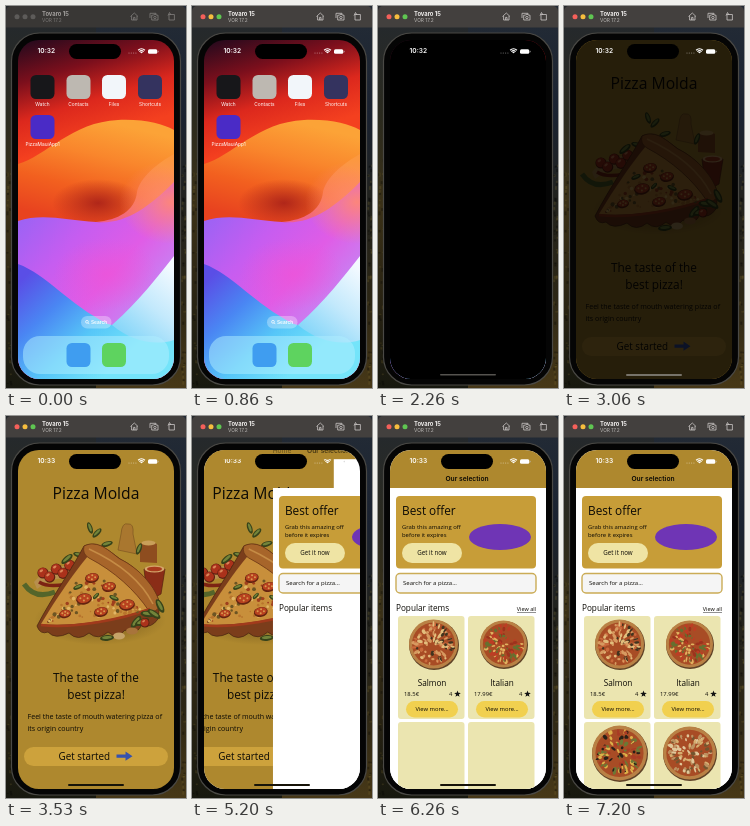
These frames come from a looping animation (180x382 px, 8000 ms). An HTML page with a canvas:

```html
<!DOCTYPE html>
<html lang="en">
<head>
<meta charset="utf-8">
<title>Pizza app demo</title>
<style>
html, body { margin: 0; width: 100%; height: 100%; overflow: hidden; background: #15130d; }
canvas { display: block; width: 180px; height: 382px; }
</style>
</head>
<body>
<canvas id="stage"></canvas>
<script>
const W = 180, H = 382, LOOP = 8000;
const SCREEN = { x: 12, y: 34, w: 156, h: 339, r: 21 };
const GOLD = '#ae882e', UI = 'Inter, sans-serif', BODY = '"Open Sans", sans-serif';
const canvas = document.getElementById('stage');
const ctx = canvas.getContext('2d');
const dpr = Math.max(1, window.devicePixelRatio || 1);
canvas.width = W * dpr;
canvas.height = H * dpr;

const clamp = v => Math.min(1, Math.max(0, v));
const mix = (a, b, p) => a + (b - a) * p;

function seeded(seed) {
  return () => (seed = (seed * 16807) % 2147483647) / 2147483647;
}

function box(x, y, w, h, r, fill, stroke, line = 1) {
  ctx.beginPath();
  ctx.roundRect(x, y, w, h, r);
  if (fill) { ctx.fillStyle = fill; ctx.fill(); }
  if (stroke) { ctx.strokeStyle = stroke; ctx.lineWidth = line; ctx.stroke(); }
}

function oval(x, y, rx, ry, fill, turn = 0) {
  ctx.beginPath();
  ctx.ellipse(x, y, rx, ry, turn, 0, Math.PI * 2);
  ctx.fillStyle = fill;
  ctx.fill();
}

const dot = (x, y, r, fill) => oval(x, y, r, r, fill);

function path(d, fill, stroke, line = 1) {
  const p = new Path2D(d);
  if (fill) { ctx.fillStyle = fill; ctx.fill(p); }
  if (stroke) { ctx.strokeStyle = stroke; ctx.lineWidth = line; ctx.stroke(p); }
}

function label(text, x, y, size, { color = '#0c0a05', align = 'left', weight = 400, font = BODY } = {}) {
  ctx.font = `${weight} ${size}px ${font}`;
  ctx.textAlign = align;
  ctx.textBaseline = 'alphabetic';
  ctx.fillStyle = color;
  ctx.fillText(text, x, y + size * 0.35);
}

function gradient(x0, y0, x1, y1, ...colors) {
  const g = ctx.createLinearGradient(x0, y0, x1, y1);
  colors.forEach((c, i) => g.addColorStop(i / (colors.length - 1), c));
  return g;
}

function scoped(draw, alpha = 1, dx = 0) {
  ctx.save();
  ctx.globalAlpha *= alpha;
  ctx.translate(dx, 0);
  draw();
  ctx.restore();
}

// Soft elliptical patch; rgb is "r,g,b"
function glow(x, y, rx, ry, rgb, strength) {
  ctx.save();
  ctx.translate(x, y);
  ctx.scale(rx, ry);
  const g = ctx.createRadialGradient(0, 0, 0, 0, 0, 1);
  g.addColorStop(0, `rgba(${rgb},${strength})`);
  g.addColorStop(1, `rgba(${rgb},0)`);
  dot(0, 0, 1, g);
  ctx.restore();
}

function fillScreen(color) {
  ctx.fillStyle = color;
  ctx.fillRect(SCREEN.x, SCREEN.y, SCREEN.w, SCREEN.h);
}

function desktop() {
  ctx.fillStyle = gradient(0, 20, 0, H, '#25292c', '#2b2a1e', '#3b3117', '#2a2413', '#17180f');
  ctx.fillRect(0, 0, 90, H);
  ctx.fillStyle = gradient(0, 20, 0, H, '#222a35', '#1a2230', '#22221c', '#2c2615', '#473817');
  ctx.fillRect(90, 0, 90, H);
  const rnd = seeded(41);
  for (let i = 0; i < 90; i++) {
    ctx.fillStyle = rnd() < 0.5 ? 'rgba(130,108,48,.22)' : 'rgba(0,0,0,.3)';
    ctx.fillRect(rnd() < 0.5 ? rnd() * 5 : 175 + rnd() * 4, 150 + rnd() * 230, 2, 1 + rnd() * 3);
  }
}

function titleBar(focused) {
  box(0, 0, W, 21.5, [5, 5, 0, 0], focused ? '#43403e' : '#393735');
  const lights = focused ? ['#f4605a', '#f6bd3e', '#5fc652'] : ['#5d5b59', '#5d5b59', '#5d5b59'];
  lights.forEach((c, i) => dot(11 + i * 8, 10.7, 2.5, c));
  const main = focused ? '#f1efee' : '#a3a09e', sub = focused ? '#bab7b5' : '#7b7876';
  label('Tovaro 15', 36, 8, 5.8, { color: main, weight: 700, font: UI });
  label('VOR 17.2', 36, 14.2, 4.8, { color: sub, font: UI });
  const ink = focused ? '#c9c6c4' : '#817e7c';
  path('M124.5 10.5 L128.3 7 L132 10.5 M125.6 10 V14 H131 V10 M127.6 14 V11.4 H129 V14', null, ink, 0.8);
  path('M144 12 V7.3 H150 V9 M145.7 9.2 H147.2 L148 8.4 H149.7 L150.4 9.2 H152 V14 H145.7 Z', null, ink, 0.8);
  ctx.beginPath();
  ctx.arc(148.9, 11.5, 1.2, 0, 7);
  ctx.stroke();
  path('M163 8.5 H168.4 V14 H163 Z M162 9.5 L163.5 6.5 L165 9', null, ink, 0.8);
}

function phoneBody() {
  box(5.5, 27, 169, 352, 28, '#050505', '#4a4945', 1.2);
}

function status(t) {
  label(t < 3300 ? '10:32' : '10:33', 31.5, 45, 6.6, { color: '#fff', weight: 600, font: UI });
  for (let i = 0; i < 4; i++) dot(123 + i * 2.3, 47, 0.6, 'rgba(255,255,255,.45)');
  for (const r of [1.2, 3, 4.8]) {
    ctx.beginPath();
    ctx.arc(135.5, 47.7, r, -2.35, -0.79);
    ctx.strokeStyle = '#fff';
    ctx.lineWidth = 1.2;
    ctx.stroke();
  }
  box(142, 43.2, 9.3, 4.6, 1.5, '#fff');
  box(151.8, 44.8, 0.7, 1.5, 0.3, '#bbb');
}

function wallpaper() {
  fillScreen(gradient(30, 34, 62, 140, '#2b0a1d', '#7c0f1c', '#dc281d', '#f4401f'));
  // Orange crest with a shaded hollow
  path('M12 158 C40 150 66 116 112 114 C140 113 156 118 168 124 V290 H12 Z',
    gradient(95, 114, 70, 216, '#fca337', '#f9862c', '#f2601f', '#e8431f'));
  glow(92, 197, 46, 24, '165,30,24', 0.85);
  path('M168 148 C150 158 134 172 131 186 C129 205 112 214 90 216 L168 225 Z',
    gradient(150, 155, 115, 220, '#fc9840', '#f97b4c', '#ef5f8f'));
  // Violet field
  path('M12 215 C36 207 60 214 90 216 C118 219 142 202 168 176 V373 H12 Z',
    gradient(18, 215, 130, 315, '#9f62f4', '#c65df0', '#e05ce6', '#c486f4'));
  glow(165, 196, 52, 42, '255,138,112', 0.9);
  glow(100, 268, 52, 36, '240,82,214', 0.65);
  // Blue floor and the pale sweep on the right
  path('M12 258 C40 268 62 298 102 318 C130 325 150 322 168 300 V373 H12 Z',
    gradient(14, 275, 100, 368, '#5a4ee6', '#4a86f3', '#56c6f8', '#74e4fa'));
  path('M168 250 C152 270 134 294 106 319 C126 336 150 340 168 334 Z',
    gradient(168, 262, 112, 330, '#f4faff', '#c3e9fc', '#7fd4f8'));
}

function homeIcons() {
  const icon = (x, y, fill, name) => {
    box(x - 12, y - 12, 24, 24, 5.5, fill);
    if (name) label(name, x, y + 17, 4.8, { color: '#fff', align: 'center', font: UI });
  };
  icon(36.5, 81, '#17171a', 'Watch');
  icon(72.5, 81, '#bdb8b1', 'Contacts');
  icon(108, 81, '#f2f6fa', 'Files');
  icon(144, 81, '#34335f', 'Shortcuts');
  icon(36.5, 121, '#4a2bc6', 'PizzaMauiApp1');
  box(75, 310, 30.5, 12.5, 6.2, 'rgba(255,255,255,.3)');
  ctx.beginPath();
  ctx.arc(81, 315.8, 1.4, 0, 7);
  ctx.strokeStyle = '#fff';
  ctx.lineWidth = 0.7;
  ctx.stroke();
  path('M82 316.8 L83.3 318.1', null, '#fff', 0.7);
  label('Search', 85, 316.2, 4.8, { color: '#fff', weight: 600, font: UI });
  box(17, 330, 146, 38, 17, 'rgba(178,240,255,.5)');
  icon(72.5, 349, '#3f9df0');
  icon(108, 349, '#5ed35f');
}

function launch(t) {
  const p = t < 970 ? 0 : 1 - Math.exp(-(t - 970) / 68);
  wallpaper();
  scoped(homeIcons, 1 - clamp((t - 970) / 150));
  if (t < 970) return;
  fillScreen(`rgba(0,0,0,${0.45 * p})`);
  const q = t > 1600 ? 1 : p;
  const x = mix(24, 12, q), y = mix(109, 34, q);
  const right = mix(48, 168, q), bottom = mix(133, 373, q);
  box(x, y, right - x, bottom - y, mix(5.5, 21, q), '#000');
  scoped(() => box(mix(36, 62, q), bottom - 5, mix(5, 56, q), 1.6, 0.8, '#55534f'), q);
}

function tomato(x, y, r) {
  dot(x, y, r, '#5f2011');
  dot(x - 0.3, y - 0.4, r * 0.85, '#ab321b');
  oval(x - r * 0.3, y - r * 0.4, r * 0.35, r * 0.2, '#da8558', -0.6);
}

function leaf(x, y, size, turn) {
  oval(x, y, size, size * 0.42, '#37431a', turn);
  oval(x, y - 0.5, size * 0.7, size * 0.2, '#72843a', turn);
}

function slicePicture() {
  glow(94, 204, 66, 25, '66,45,14', 0.55);
  // Ingredients behind the slice
  leaf(84, 112, 6, -1.9);
  leaf(91, 117, 6, -0.8);
  path('M112 134 L115 118 Q116 106 122 108 Q128 107 127 118 L131 138 Z', '#a9772f', '#76501f', 0.6);
  path('M134 146 V128 Q142 122 151 128 V147 Z', '#8e4d1f');
  oval(142.5, 127, 7, 2.5, '#c99f59');
  path('M138 153 H159 L155 178 Q148 183 141 178 Z', '#8a2d17', '#542311', 0.7);
  oval(148.5, 153, 10, 3.4, '#d3a468');
  oval(148.5, 153, 7.5, 2.3, '#a93a1c');
  leaf(101, 128, 6, -0.3);
  leaf(133, 133, 6, -1.2);
  path('M28 166 Q45 145 76 151 L70 164 Q48 158 31 173 Z', '#b78f4d');
  for (let i = 0; i < 7; i++) tomato(37 + i * 6.7, 157 - i * 1.9 + (i % 2) * 6, 5.6);
  path('M18 168 Q29 184 49 176', null, '#54652a', 5);
  path('M33 166 Q43 172 60 168', null, '#7c2313', 3.5);
  leaf(61, 143, 7, -0.7);
  leaf(73, 139, 6, 0.3);
  // Slice, its crust and the dripping edge
  path('M31 210 C46 181 66 153 78 130 C92 124 103 135 114 143 C132 152 146 168 154 187 L152 203 Q145 213 136 209 Q128 222 119 214 Q111 224 102 216 Q92 225 83 217 Q72 226 63 217 Q49 224 42 216 Q34 219 31 210 Z', '#7b3d1b', '#4e2a12', 0.8);
  path('M35 208 C50 183 67 158 82 140 C101 147 126 171 143 192 C116 203 69 211 35 208 Z', '#c88f3b');
  path('M78 130 C92 123 103 135 114 143 C133 152 151 172 154 189 Q151 197 143 195 C129 174 108 155 83 142 Q76 138 78 130 Z', '#a7652a', '#6a3515', 0.8);
  path('M83 133 C109 145 134 162 147 188', null, '#c58b45', 1.6);
  path('M35 209 C69 213 116 203 144 193', null, '#a13a1c', 2.4);
  const rnd = seeded(77);
  for (let i = 0; i < 95; i++) {
    const u = rnd(), v = rnd();
    dot(42 + u * 92, 206 - u * 10 - v * Math.min(50, u * 120, (1.03 - u) * 85), 0.8 + rnd() * 1.3,
      ['#e1b665', '#9f3f1d', '#b8752d', '#6c5523'][Math.floor(rnd() * 4)]);
  }
  [[86, 162, 7], [103, 171, 7], [78, 183, 8], [59, 198, 6], [121, 189, 8], [95, 196, 7]].forEach(([x, y, r]) => {
    oval(x, y, r, r * 0.7, '#652310', -0.2);
    oval(x, y - 0.7, r * 0.87, r * 0.56, '#b8421f', -0.2);
    for (let i = 0; i < 4; i++) dot(x + Math.cos(i * 1.6) * r * 0.45, y - 0.7 + Math.sin(i * 1.6) * r * 0.28, 1, '#d99a4f');
  });
  leaf(72, 171, 5, -0.4);
  leaf(108, 182, 5, 0.4);
  leaf(90, 180, 4, -0.8);
  // Garnish in front
  for (let i = 0; i < 5; i++) leaf(130 + i * 6, 206 - i * 4 + (i % 2) * 4, 7.5, -0.9 + i * 0.5);
  tomato(139, 207, 4.5);
  oval(113, 220, 6, 3.5, '#c5a368');
  oval(126, 215, 6, 3.5, '#a8743b');
  leaf(101, 222, 7, -0.1);
}

function welcome() {
  fillScreen(GOLD);
  const mid = { align: 'center' };
  label('Pizza Molda', 90, 78, 15.7, mid);
  slicePicture();
  label('The taste of the', 90, 262, 11.8, mid);
  label('best pizza!', 90, 278.5, 11.8, mid);
  label('Feel the taste of mouth watering pizza of', 21.5, 301, 7.1);
  label('its origin country', 21.5, 313, 7.1);
  box(18, 331, 144, 19, 9.5, '#cda23c');
  label('Get started', 52.5, 340.3, 9.9);
  path('M110.5 338.6 H119.5 V335.6 L126.5 340.2 L119.5 344.8 V341.8 H110.5 Z', '#3652ae');
}

function pizza(x, y, r, seed, colors) {
  const rnd = seeded(seed);
  dot(x + 0.5, y + 1, r, '#5f4227');
  dot(x, y, r * 0.98, '#b98145');
  dot(x, y, r * 0.86, '#a84c25');
  for (let i = 0; i < 100; i++) {
    const a = rnd() * 6.283, d = Math.sqrt(rnd()) * r * 0.8;
    oval(x + Math.cos(a) * d, y + Math.sin(a) * d, 1 + rnd() * 2, 0.7 + rnd() * 1.2,
      colors[Math.floor(rnd() * colors.length)], a);
  }
}

const MENU = [
  { x: 20, y: 200, name: 'Salmon', price: '18.5€', r: 25, seed: 13, colors: ['#e2bd7c', '#c96a3c', '#41341f', '#d79a60'] },
  { x: 90, y: 200, name: 'Italian', price: '17.99€', r: 24, seed: 29, colors: ['#bd3d24', '#e1b25f', '#9d321d', '#66702f'] },
  { x: 20, y: 306, r: 28, seed: 51, colors: ['#292017', '#ddb049', '#a93c25', '#6b7835'] },
  { x: 90, y: 306, r: 27, seed: 83, colors: ['#e0c79a', '#bc9160', '#73552f', '#d6ae70'] }
];

function card({ x, y, name, price, r, seed, colors }, loaded) {
  box(x, y, 66.5, 103, 3, '#ebe5b0');
  const mid = x + 34;
  if (loaded) pizza(mid + 1.5, y + (name ? 28 : 31), r, seed, colors);
  if (!name) return;
  label(name, mid, y + 67, 8.2, { align: 'center' });
  label(price, x + 6, y + 78.3, 5.9);
  label('4', x + 51, y + 78.3, 5.9);
  ctx.beginPath();
  for (let i = 0; i < 10; i++) {
    const a = i * Math.PI / 5 - Math.PI / 2, d = i % 2 ? 1.4 : 3.5;
    ctx.lineTo(x + 59.5 + Math.cos(a) * d, y + 78 + Math.sin(a) * d);
  }
  ctx.fillStyle = '#111';
  ctx.fill();
  box(x + 8, y + 85, 52, 16.5, 8.2, '#f1d04f');
  label('View more...', mid, y + 93.2, 5.8, { align: 'center' });
}

function shop(t) {
  ctx.fillStyle = '#fff';
  ctx.fillRect(12, 72, 156, 301);
  box(18, 80, 140, 72.5, 4, '#c79d38');
  label('Best offer', 24, 94.5, 11.8);
  label('Grab this amazing off', 24, 110.5, 5.9);
  label('before it expires', 24, 118.5, 5.9);
  box(24, 127, 60, 20, 10, '#efe4a4');
  label('Get it now', 54, 137, 6.2, { align: 'center' });
  oval(122, 121, 31, 13, '#6f35b5');
  box(18, 157.5, 140, 19.5, 4, '#f5f5f5', '#cbac56', 1.4);
  label('Search for a pizza...', 25, 167.2, 6);
  label('Popular items', 18, 192, 8.2);
  label('View all', 158, 193.5, 5.5, { align: 'right' });
  ctx.fillStyle = '#222';
  ctx.fillRect(139, 196.3, 19, 0.5);
  if (t >= 6200) MENU.forEach((item, i) => card(item, t >= 6260 + Math.floor(i / 2) * 70));
}

function push(t) {
  const s = Math.exp(-Math.max(0, t - 5089) / 136);
  const offset = t > 6200 ? 0 : 156 * s;
  fillScreen('#fff');
  if (offset > 3) scoped(welcome, 1, -47 * (1 - s));
  status(t);
  scoped(() => shop(t), 1, offset);
  // The bar drops in after the page starts moving
  const down = clamp((t - 5165) / 145);
  const lift = -38 * (1 - down);
  ctx.fillStyle = GOLD;
  ctx.fillRect(12, 34 + lift, 156, 38);
  scoped(() => label('Home', 90, 63 + lift, 6.7, { align: 'center', font: UI }), 0.6 * (1 - down));
  scoped(() => label('Our selection', 89, 63 + lift, 6.7, { align: 'center', weight: 600, font: UI }),
    mix(0.5, 1, down), offset * 0.69);
  if (down > 0.9) status(t);
}

function screen(t) {
  ctx.save();
  ctx.beginPath();
  ctx.roundRect(SCREEN.x, SCREEN.y, SCREEN.w, SCREEN.h, SCREEN.r);
  ctx.clip();
  if (t < 2900) launch(t);
  else if (t < 5200) {
    welcome();
    fillScreen(`rgba(0,0,0,${1 - clamp((t - 2930) / 600)})`);
  } else push(t);
  if (t < 5200) status(t);
  if (t >= 2900) box(62, 368, 56, 2, 1, t < 3250 ? '#77736a' : '#171409');
  ctx.restore();
  box(63, 38, 52, 15, 7.5, '#000');
}

function render(now) {
  let t = now % LOOP;
  if (t >= 5200 && t < 5260) t = 5200;
  else if (t >= 5260 && t < 5400) t = 5260;
  ctx.setTransform(dpr, 0, 0, dpr, 0, 0);
  desktop();
  phoneBody();
  screen(t);
  titleBar(t >= 60);
}

const start = performance.now();
function tick() {
  render(performance.now() - start);
  requestAnimationFrame(tick);
}
tick();
</script>
</body>
</html>
```
